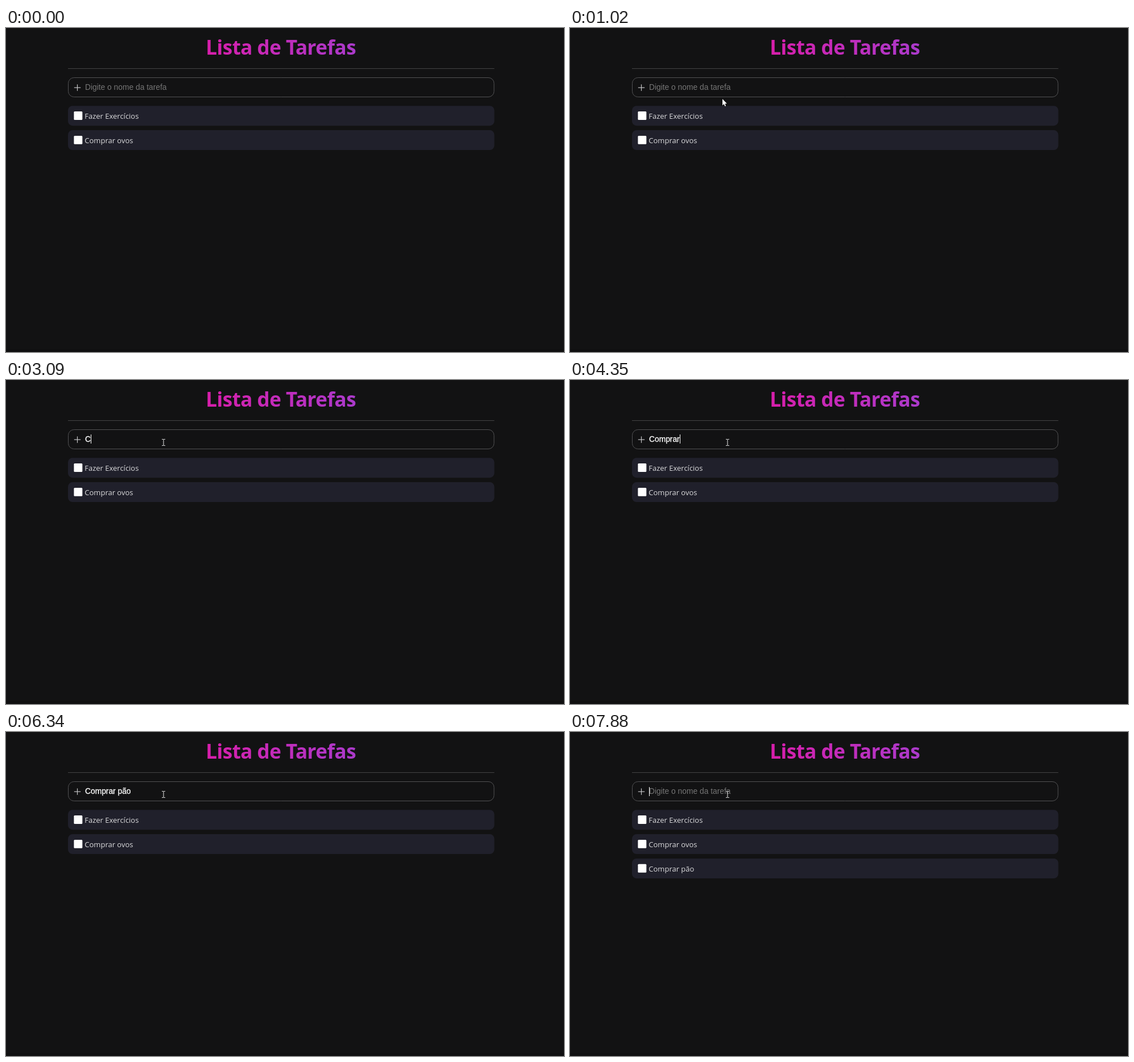
An HTML page with a canvas for the animation above (8000 ms loop, 981 by 571 pixels).

```html
<!DOCTYPE html>
<html lang="pt">
<head>
<meta charset="utf-8">
<title>Lista de Tarefas</title>
<style>
  html, body { margin: 0; width: 100%; height: 100%; overflow: hidden; background: #121213; }
  canvas { display: block; width: 981px; height: 571px; }
</style>
</head>
<body>
<canvas id="stage" width="981" height="571"></canvas>
<script>
const ctx = document.getElementById('stage').getContext('2d');
const LOOP = 8000;
const LEFT = 109, WIDTH = 749.5, TEXT_X = 139;
const TITLE_FONT = 'bold 35px "Open Sans", "Noto Sans", sans-serif';
const ITEM_FONT = '13px "Open Sans", "Noto Sans", sans-serif';
const INPUT_FONT = '13.8px "Liberation Sans", Arial, sans-serif';

const ENTER = 270, HOVER = 1020, REST = 1300;
const CLICKS = [1500, 7140], CLICK_LENGTH = 75;
const SUBMIT = 6410, BLINK = 515;
const PHRASE = 'Comprar pão';

// typing pace: [time, letters typed so far]
const PACE = [[3090, 1], [3490, 2], [3880, 5], [4350, 7], [4880, 9], [5610, 10], [5810, 11]];
const keyTimes = [PACE[0][0]];
for (let i = 1; i < PACE.length; i++) {
  const [from, before] = PACE[i - 1], [to, after] = PACE[i];
  for (let n = 1; n <= after - before; n++) {
    keyTimes.push(from + (to - from) * n / (after - before));
  }
}

const mix = (a, b, u) => a + (b - a) * u;
const bezier = (a, b, c, d, u) =>
  mix(mix(mix(a, b, u), mix(b, c, u), u), mix(mix(b, c, u), mix(c, d, u), u), u);
// progress from start to end in equal jumps
const stepped = (t, start, end, steps) =>
  Math.min(1, Math.floor((t - start) / (end - start) * steps) / steps);

function box(x, y, w, h, r) {
  ctx.beginPath();
  ctx.roundRect(x, y, w, h, r);
}

function text(str, x, y, font, color) {
  ctx.font = font;
  ctx.fillStyle = color;
  ctx.fillText(str, x, y);
}

function drawHeader() {
  const fade = ctx.createLinearGradient(352, 0, 617, 0);
  fade.addColorStop(0, '#d81eab');
  fade.addColorStop(1, '#aa3acb');
  ctx.letterSpacing = '-0.5px';
  text('Lista de Tarefas', 351.3, 46.5, TITLE_FONT, fade);
  ctx.letterSpacing = '0px';
  ctx.fillStyle = '#434344';
  ctx.fillRect(LEFT, 71, WIDTH, 1);
}

function drawInput(typed, caretOn) {
  box(LEFT + 0.5, 87.5, WIDTH - 1, 34, 10);
  ctx.strokeStyle = '#525254';
  ctx.lineWidth = 1;
  ctx.stroke();

  ctx.fillStyle = '#c4c4c6';
  ctx.fillRect(119.8, 104.5, 11.4, 1.2);
  ctx.fillRect(124.9, 99.4, 1.2, 11.4);

  const baseline = 109;
  if (typed) {
    text(typed, TEXT_X, baseline, INPUT_FONT, '#fff');
    ctx.strokeStyle = '#fff';
    ctx.lineWidth = 0.3;
    ctx.strokeText(typed, TEXT_X, baseline);
  } else {
    text('Digite o nome da tarefa', TEXT_X, baseline, INPUT_FONT, '#757575');
  }
  if (caretOn) {
    ctx.fillStyle = '#fff';
    ctx.fillRect(Math.round(TEXT_X + ctx.measureText(typed).width), typed ? 96 : 97, 1, 16);
  }
}

function drawItem(label, index) {
  const y = 137.2 + index * 42.85;
  box(LEFT, y, WIDTH, 35, 8);
  ctx.fillStyle = '#20202b';
  ctx.fill();
  box(119.4, y + 9.9, 14.9, 14.9, 1.5);
  ctx.fillStyle = '#fff';
  ctx.fill();
  text(label, 138.3, Math.round(y + 22.8), ITEM_FONT, '#dadadc');
}

function drawArrow(x, y) {
  const outline = [[0, 0], [0, 11.4], [2.6, 9], [4.4, 13], [6.1, 12.2], [4.4, 8.4], [7.9, 8.2]];
  ctx.beginPath();
  outline.forEach(([dx, dy]) => ctx.lineTo(x + dx, y + dy));
  ctx.closePath();
  ctx.strokeStyle = '#000';
  ctx.lineWidth = 0.8;
  ctx.stroke();
  ctx.fillStyle = '#fff';
  ctx.fill();
}

function drawBeam(x, y) {
  ctx.fillStyle = '#d8d8d8';
  ctx.fillRect(x - 0.6, y - 6, 1.1, 12);
  for (const end of [-6, 5]) {
    ctx.fillRect(x - 3, y + end, 2.4, 1);
    ctx.fillRect(x + 0.5, y + end, 2.4, 1);
  }
}

function drawPointer(t) {
  if (t < ENTER) return;
  const sweep = stepped(t, ENTER, HOVER, 10);
  const rise = Math.max(0, stepped(t, HOVER, REST, 4));
  const x = bezier(709, 330, 165, 268, sweep) + 9 * rise;
  const y = bezier(522, 230, 145, 125, sweep) - 15 * rise;

  if (CLICKS.some(down => t >= down && t < down + CLICK_LENGTH)) {
    ctx.beginPath();
    ctx.arc(x - 2.5, y - 0.5, 9.3, 0, Math.PI * 2);
    ctx.fillStyle = 'rgba(255, 255, 0, 0.47)';
    ctx.fill();
  }
  if (y > 121) drawArrow(x, y);
  else drawBeam(x, y);
}

// the caret restarts its blink at the first click and at every key
function caretVisible(t) {
  const since = [CLICKS[0], ...keyTimes].filter(at => at <= t).pop();
  return since !== undefined && Math.floor((t - since) / BLINK) % 2 === 0;
}

function draw(t) {
  ctx.fillStyle = '#121213';
  ctx.fillRect(0, 0, 981, 571);
  ctx.fillStyle = '#101011';
  ctx.fillRect(0, 566, 981, 5);

  const submitted = t >= SUBMIT;
  const letters = keyTimes.filter(at => at <= t).length;
  const items = ['Fazer Exercícios', 'Comprar ovos'];
  if (submitted) items.push(PHRASE);

  drawHeader();
  drawInput(submitted ? '' : PHRASE.slice(0, letters), caretVisible(t));
  items.forEach(drawItem);
  drawPointer(t);
}

const start = performance.now();
function tick() {
  draw((performance.now() - start) % LOOP);
  requestAnimationFrame(tick);
}
tick();
</script>
</body>
</html>
```
